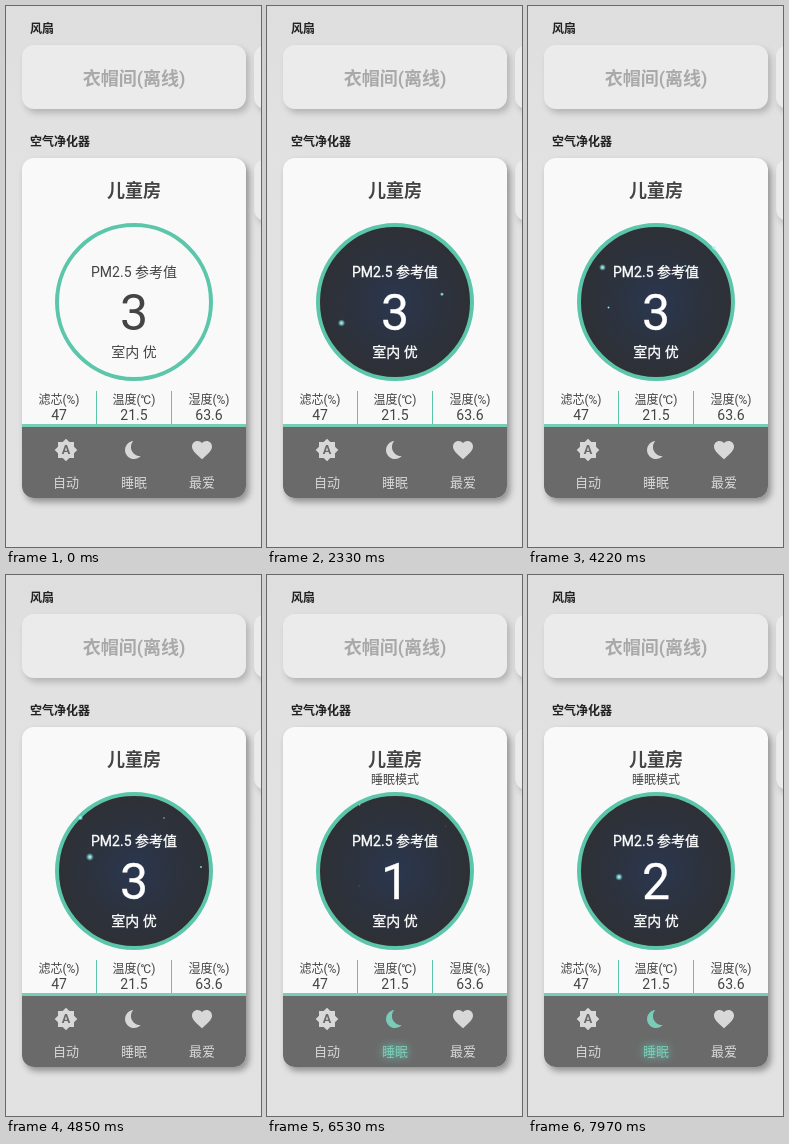
An HTML page for the animation above (8000 ms loop, 255 by 541 pixels).

```html
<!DOCTYPE html>
<html lang="zh-CN">
<head>
<meta charset="utf-8">
<title>空气净化器</title>
<style>
  html, body { margin: 0; width: 100%; height: 100%; overflow: hidden; background: #e1e1e1; }
  svg { display: block; }
  text { font-family: Roboto, "Noto Sans CJK SC", "Noto Sans CJK", sans-serif; fill: #444; text-anchor: middle; }
  .head { font-size: 12px; font-weight: 700; fill: #212121; text-anchor: start; }
  .title { font-size: 18px; font-weight: 700; }
  .s12 { font-size: 12px; }
  .s14 { font-size: 14px; }
  .big { font-size: 50px; }
  .btn text { font-size: 13px; }
  .btn text, .btn path { fill: #d8d8d8; }
  .btn.on text, .btn.on path { fill: #7accb8; }
  .btn.on text { text-shadow: 0 0 8px #6fe0c4; }
  .dark text { fill: #fff; stroke: #fff; stroke-width: .3px; }
  .card { filter: drop-shadow(3px 4px 3px rgba(0, 0, 0, .36)); }
  .dim { filter: drop-shadow(3px 4px 3px rgba(0, 0, 0, .2)); }
</style>
</head>
<body>
<svg width="255" height="541" viewBox="0 0 255 541">
  <defs>
    <linearGradient id="page" x2="0" y2="1">
      <stop stop-color="#dedede"/><stop offset=".2" stop-color="#e1e1e1"/><stop offset="1" stop-color="#e2e2e2"/>
    </linearGradient>
    <radialGradient id="night">
      <stop stop-color="#2b3750"/><stop offset=".5" stop-color="#2c3340"/><stop offset="1" stop-color="#2e3035"/>
    </radialGradient>
    <radialGradient id="glow">
      <stop offset=".18" stop-color="#9ff"/><stop offset="1" stop-color="#9ff" stop-opacity="0"/>
    </radialGradient>
    <clipPath id="cardClip"><rect x="16" y="152" width="224" height="340" rx="12"/></clipPath>
    <clipPath id="skyClip"><rect x="49" y="221" width="158" height="111"/></clipPath>
  </defs>

  <rect width="255" height="541" fill="url(#page)"/>
  <text class="head" x="24" y="27">风扇</text>
  <text class="head" x="24" y="140">空气净化器</text>

  <g class="dim" fill="#ebebeb">
    <rect x="16" y="39" width="224" height="64" rx="12"/>
    <rect x="248" y="39" width="40" height="64" rx="12"/>
    <rect x="248" y="153" width="40" height="62" rx="12"/>
  </g>
  <text class="title" x="128" y="78.5" style="fill:#a9a9a9">衣帽间(离线)</text>

  <rect class="card" x="16" y="152" width="224" height="340" rx="12" fill="#f9f9f9"/>
  <text class="title" x="128" y="191">儿童房</text>
  <text class="s12" id="mode" x="128" y="209">睡眠模式</text>

  <g clip-path="url(#cardClip)">
    <rect x="16" y="421" width="224" height="71" fill="#6a6a6a"/>
    <rect x="16" y="418" width="224" height="3" fill="#78cdb6"/>
  </g>
  <path d="M90.5 385V418M165.5 385V418" stroke="#5cc6ab"/>
  <g id="stats"></g>
  <g id="buttons"></g>

  <circle id="dial" cx="128" cy="296" r="77" stroke="#5cc6ab" stroke-width="4"/>
  <g id="sky" clip-path="url(#skyClip)"></g>
  <g id="info">
    <text class="s14" x="128" y="271">PM2.5 参考值</text>
    <text class="big" id="value" x="128" y="323.5">3</text>
    <text class="s14" x="128" y="351">室内 优</text>
  </g>
</svg>
<script>
const LOOP = 8000, NIGHT = 500, SLEEP = 5330, UPDATE = 6950;
const $ = id => document.getElementById(id);

const stats = [[53, '滤芯(%)', '47'], [128, '温度(℃)', '21.5'], [203, '湿度(%)', '63.6']];
$('stats').innerHTML = stats.map(([x, name, val]) =>
  `<text class="s12" x="${x}" y="398">${name}</text><text class="s14" x="${x}" y="414">${val}</text>`).join('');

const buttons = [
  [60, '自动', 'M14.3,16L13.6,14H10.4L9.7,16H7.8L11,7H13L16.2,16H14.3M20,8.69V4H15.31L12,.69L8.69,4H4V8.69L.69,12L4,15.31V20H8.69L12,23.31L15.31,20H20V15.31L23.31,12L20,8.69M10.85,12.65H13.15L12,9L10.85,12.65Z'],
  [128, '睡眠', 'M18.73,18C15.4,21.69 9.71,22 6,18.64C2.33,15.31 2.04,9.62 5.37,5.93C6.9,4.25 9,3.2 11.27,3C7.96,6.7 8.27,12.39 12,15.71C13.63,17.19 15.78,18 18,18C18.25,18 18.5,18 18.73,18Z'],
  [196, '最爱', 'M12,21.35L10.55,20.03C5.4,15.36 2,12.27 2,8.5C2,5.41 4.42,3 7.5,3C9.24,3 10.91,3.81 12,5.08C13.09,3.81 14.76,3 16.5,3C19.58,3 22,5.41 22,8.5C22,12.27 18.6,15.36 13.45,20.03L12,21.35Z']
];
$('buttons').innerHTML = buttons.map(([x, name, icon]) =>
  `<g class="btn"><path transform="translate(${x - 12} 432)" fill-rule="evenodd" d="${icon}"/>` +
  `<text x="${x}" y="481">${name}</text></g>`).join('');
const sleepBtn = $('buttons').children[1];

// Fireflies: position at time `at`, speed in px/s, size, time of smallest pulse, first and last moment (s)
const flies = [
  { at: 1.16, x: 168, y: 317, vx: 5.96, vy: -24.6, size: 4, low: 1.05, from: .89, to: 5.05 },
  { at: 2.33, x: 74.5, y: 317, vx: 0, vy: -29.4, size: 4.5, low: 1.65, from: 2.15, to: 5.6 },
  { at: 3.56, x: 77, y: 322, vx: 5.3, vy: -31, size: 7, low: .53, from: 3.42, to: 6.8 },
  { at: 4.85, x: 158, y: 243, vx: 1, vy: -27, size: 2, low: 1.6, from: 3.4, to: 5.7 },
  { at: 4.85, x: 195, y: 292, vx: -9.9, vy: -24, size: 2.5, low: .53, from: 4, to: 7.8 },
  { at: 6.53, x: 92, y: 311, vx: -11, vy: -30, size: 2, low: .35, from: 6.05, to: 7.9 },
  { at: 7.97, x: 91, y: 302, vx: 1, vy: -30, size: 4.5, low: 1.2, from: 7.3, to: 8 }
];
$('sky').innerHTML = flies.map(() => '<circle fill="url(#glow)" opacity=".92"/>').join('');
const dots = [...$('sky').children];

const ease = p => 1 - (1 - p) ** 2.2;

// Two-second pulse between 0.4 and 2.2
function pulse(s, low) {
  const p = ((s - low) % 2 + 2) % 2;
  return .4 + 1.8 * (p < 1 ? ease(p) : 1 - ease(p - 1));
}

function draw(now) {
  const t = now % LOOP, s = t / 1000;
  const night = t >= NIGHT, sleep = t >= SLEEP;
  $('dial').setAttribute('fill', night ? 'url(#night)' : '#f9f9f9');
  $('info').classList.toggle('dark', night);
  $('mode').style.display = sleep ? '' : 'none';
  sleepBtn.classList.toggle('on', sleep);
  $('value').textContent = t >= UPDATE ? 2 : sleep ? 1 : 3;
  flies.forEach((f, i) => {
    const dot = dots[i], dt = s - f.at;
    dot.style.display = s >= f.from && s < f.to ? '' : 'none';
    dot.setAttribute('cx', f.x + f.vx * dt);
    dot.setAttribute('cy', f.y + f.vy * dt);
    dot.setAttribute('r', .4 * f.size * pulse(s, f.low));
  });
}

function tick() {
  draw(performance.now());
  requestAnimationFrame(tick);
}
tick();
</script>
</body>
</html>
```
